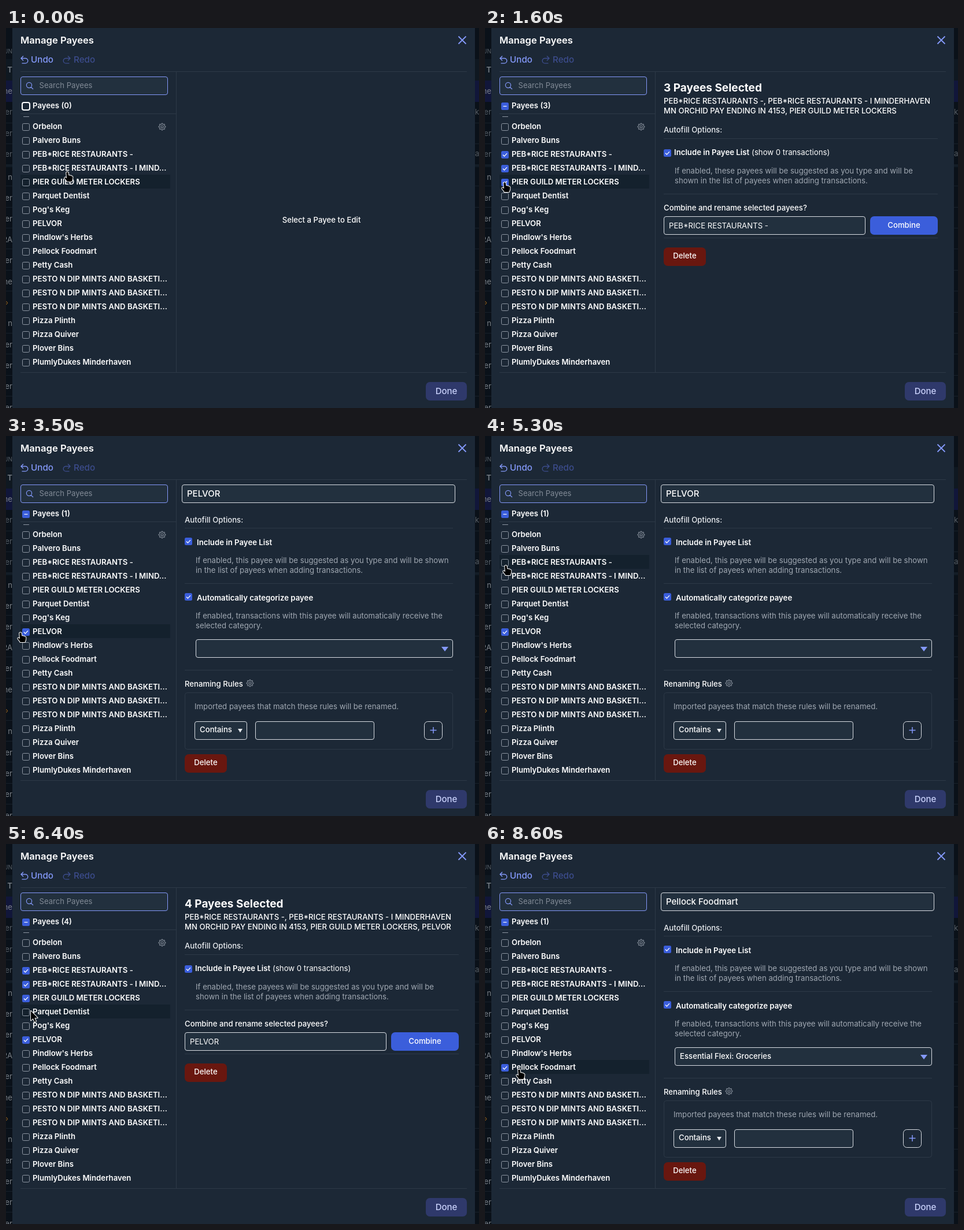
An HTML page with a canvas that plays this animation: 818 px wide and 658 px high, repeating every 9.1 s.

```html
<!DOCTYPE html>
<html lang="en">
<head>
<meta charset="utf-8">
<title>Manage Payees</title>
<style>
html, body { margin: 0; width: 100%; height: 100%; overflow: hidden; background: #0a1119; }
canvas { display: block; width: 818px; height: 658px; }
</style>
</head>
<body>
<canvas id="stage"></canvas>
<script>
const W = 818, H = 658, LOOP = 9100, STEP = 100;
const canvas = document.getElementById('stage');
const ctx = canvas.getContext('2d');
const dpr = window.devicePixelRatio || 1;
canvas.width = W * dpr;
canvas.height = H * dpr;

const C = {
  panel: '#1c2836', field: '#22303e', hover: '#14212d', line: '#2d3947', text: '#ffffff',
  soft: '#e8ebef', grey: '#a0a8b2', dim: '#818a96', accent: '#8499fa', faded: '#3c4c8c',
  blue: '#3b5edb', edge: '#d9dde3', box: '#8d96a2', red: '#69170f', done: '#2f396b'
};

const CITY = 'MINDERHAVEN';
const PESTO = 'PESTO N DIP MINTS AND BASKETI...';
const payees = [
  'Orbelon', 'Palvero Buns', 'PEB*RICE RESTAURANTS -', 'PEB*RICE RESTAURANTS - I MIND...',
  'PIER GUILD METER LOCKERS', 'Parquet Dentist', "Pog's Keg", 'PELVOR', "Pindlow's Herbs",
  'Pellock Foodmart', 'Petty Cash', PESTO, PESTO, PESTO, 'Pizza Plinth', 'Pizza Quiver',
  'Plover Bins', 'PlumlyDukes Minderhaven'
];
const categories = { 2: 'V:Fun: \u0394 Dining Out', 7: '', 9: 'Essential Flexi: Groceries' };

// time, ticked rows, rows shown in the detail panel
const states = [
  [0, [], []],
  [700, [2], [2]],
  [1200, [2, 3], [2, 3]],
  [1400, [2, 3, 4], [2, 3]],
  [1600, [2, 3, 4], [2, 3, 4]],
  [3500, [7], [7]],
  [5600, [7, 2], [7, 2]],
  [6000, [7, 2, 3], [7, 2, 3]],
  [6300, [7, 2, 3, 4], [7, 2, 3, 4]],
  [7500, [9], [9]]
];

// time, x, y of the pointer tip
const path = [
  [-100, 106, 262], [0, 106, 249], [400, 35, 216], [800, 33, 217], [1000, 34, 250],
  [1100, 34, 261], [1200, 34, 267], [1600, 34, 267], [2300, 25, 344], [2900, 25, 344],
  [3000, 25, 340], [4600, 25, 340], [5200, 37, 229], [5300, 36, 224], [5400, 36, 223],
  [5600, 36, 222], [5900, 35, 243], [6000, 35, 245], [6200, 36, 266], [6300, 41, 280],
  [6400, 43, 289], [6500, 43, 303], [7100, 57, 391], [8400, 57, 391], [8500, 61, 397],
  [8600, 59, 390], [9100, 59, 390]
];

function tipAt(t) {
  let i = 1;
  while (i < path.length - 1 && path[i][0] < t) i++;
  const [t0, x0, y0] = path[i - 1], [t1, x1, y1] = path[i];
  let k = Math.min(1, Math.max(0, (t - t0) / (t1 - t0)));
  if (t1 - t0 > 300) k = k * k * (3 - 2 * k);
  return { x: x0 + (x1 - x0) * k, y: y0 + (y1 - y0) * k };
}

function text(s, x, y, { size = 13.2, weight = 400, color = C.text, align = 'left' } = {}) {
  ctx.font = `${weight} ${size}px Inter, "Open Sans", sans-serif`;
  ctx.fillStyle = color;
  ctx.textAlign = align;
  ctx.fillText(s, x, y);
  return ctx.measureText(s).width;
}

function fill(x, y, w, h, r, color) {
  ctx.fillStyle = color;
  ctx.beginPath();
  ctx.roundRect(x, y, w, h, r);
  ctx.fill();
}

// outline on pixel centres
function frame(x, y, w, h, r, color, width = 1) {
  const d = width / 2;
  ctx.strokeStyle = color;
  ctx.lineWidth = width;
  ctx.beginPath();
  ctx.roundRect(x + d, y + d, w - width, h - width, r);
  ctx.stroke();
}

function field(x, y, w, color = C.edge) {
  fill(x, y, w, 32, 4, C.field);
  frame(x, y, w, 32, 3.5, color);
}

function stroke(d, color, width = 1) {
  ctx.strokeStyle = color;
  ctx.lineWidth = width;
  ctx.stroke(new Path2D(d));
}

const rule = (x0, x1, y) => { ctx.fillStyle = C.line; ctx.fillRect(x0, y, x1 - x0, 1); };

function triangle(x, y, w, h, color) {
  ctx.fillStyle = color;
  ctx.fill(new Path2D(`M${x - w / 2} ${y}h${w}l${-w / 2} ${h}Z`));
}

function ticked(cx, cy) {
  fill(cx - 6.5, cy - 6.5, 13, 13, 2.5, C.blue);
  stroke(`M${cx - 3.5} ${cy}l2.4 2.6l4.6 -5`, '#fff', 1.3);
}

function gear(cx, cy) {
  ctx.strokeStyle = C.dim;
  ctx.lineWidth = 1.1;
  ctx.beginPath();
  for (let i = 0; i <= 64; i++) {
    const a = i * Math.PI / 32;
    const r = 5.1 + 0.8 * Math.tanh(3 * Math.cos(8 * a));
    ctx.lineTo(cx + r * Math.cos(a), cy + r * Math.sin(a));
  }
  ctx.stroke();
  ctx.beginPath();
  ctx.arc(cx, cy, 2, 0, 7);
  ctx.stroke();
}

function button(label, x, y, w, color, dy) {
  fill(x, y, w, 32, 7, color);
  text(label, x + w / 2, y + dy, { weight: 500, align: 'center' });
}

function backdrop() {
  ctx.fillStyle = '#0a1119';
  ctx.fillRect(0, 0, W, H);
  ctx.fillStyle = '#0f1821';
  ctx.fillRect(0, 54, W, 37);
  ctx.fillStyle = '#11163a';
  ctx.fillRect(0, 91, W, 37);
  ctx.fillStyle = '#111b25';
  ctx.fillRect(0, 236, W, 5);
  for (let y = 164; y < H; y += 36.4) {
    ctx.fillStyle = '#18212b';
    ctx.fillRect(0, Math.round(y), W, 1);
  }
  const cells = ['ne', 'er', 'er', 'er', 'n', 'er', 'er', 'RA', 'er', 'ne', '\u203a', 'n', 'er', 'er', 'er', 'er'];
  text('UN', 11, 44, { size: 10, color: '#565e67', align: 'right' });
  text('d T', 11, 77, { weight: 600, color: '#777e86', align: 'right' });
  cells.forEach((s, i) => {
    const y = 114 + 36.3 * i + (i > 3 ? 3.5 : 0) - (i > 6 ? 0.5 : 0);
    const color = s === '\u203a' ? '#8a5a1c' : i > 0 && i < 4 ? '#555c64' : '#7b8188';
    text(s, s === '\u203a' ? 4 : 11, y, { color, align: 'right' });
  });
  text('ki', 811, 150, { color: '#555c64' });
  text('ag', 811, 222, { color: '#555c64' });
  ctx.fillStyle = C.panel;
  ctx.fillRect(11, 0, 800, H);
}

function chrome() {
  text('Manage Payees', 25, 27, { size: 16.6, weight: 600 });
  stroke('M782.5 14.5l13 13M795.5 14.5l-13 13', C.accent, 1.8);
  const back = 'M30 48.5l-4 4l4 4M26 52.5h7.5a4.3 4.3 0 0 1 0 8.6h-6';
  stroke(back, C.accent, 1.4);
  text('Undo', 43, 60, { size: 15.2, weight: 500, color: C.accent });
  ctx.save();
  ctx.translate(137, 0);
  ctx.scale(-1, 1);
  stroke(back, C.faded, 1.4);
  ctx.restore();
  text('Redo', 117, 60, { size: 15.2, weight: 500, color: C.faded });
  rule(25, 797, 75);
  rule(25, 797, 596);
  ctx.fillStyle = C.line;
  ctx.fillRect(294, 76, 1, 520);
  fill(726, 613, 71, 32, 7, C.done);
  text('Done', 761.5, 634, { size: 15, weight: 500, color: '#c9d1fb', align: 'center' });
}

function list(ticks, count, hover, underline) {
  field(25, 84, 255, C.accent);
  ctx.strokeStyle = C.accent;
  ctx.lineWidth = 1.2;
  ctx.beginPath();
  ctx.arc(40, 99, 4.6, 0, 7);
  ctx.moveTo(43.3, 102.3);
  ctx.lineTo(47, 106);
  ctx.stroke();
  text('Search Payees', 57.5, 104, { size: 13.1, color: C.dim });

  if (count) {
    fill(28, 129, 13, 13, 2.5, C.blue);
    stroke('M31.5 135.5h6', '#fff', 1.2);
  } else {
    frame(27, 128, 15, 15, 3, '#fff', 2);
  }
  text(`Payees (${count})`, 46, 139, { weight: 600 });
  rule(25, 294, 148);
  ctx.fillStyle = C.box;
  ctx.fillRect(30, 153, 10, 1);

  fill(25, 158 + 24 * hover, 259, 24, 0, C.hover);
  payees.forEach((name, i) => {
    const y = 24 * i;
    if (ticks.includes(i)) ticked(34.5, 171.5 + y);
    else frame(28, 165 + y, 13, 13, 2, C.box);
    const w = text(name, 46, 175 + y, { weight: 600 });
    if (underline === i) {
      ctx.fillStyle = C.text;
      ctx.fillRect(46, 176 + y, w, 1);
    }
  });
  gear(270, 171);
}

function options(lines, x, y) {
  lines.forEach((s, i) => text(s, x, y + 17 * i, { color: C.grey }));
}

function editor(row) {
  field(304, 84, 473);
  text(payees[row], 313, 105, { size: 15, weight: 500 });
  text('Autofill Options:', 309, 150, { weight: 500, color: C.soft });
  rule(309, 773, 159);
  ticked(315.5, 182.5);
  text('Include in Payee List', 330, 189, { weight: 600 });
  options(['If enabled, this payee will be suggested as you type and will be shown',
    'in the list of payees when adding transactions.'], 328, 220);
  rule(309, 773, 255);
  ticked(315.5, 278.5);
  text('Automatically categorize payee', 330, 285, { weight: 600 });
  options(['If enabled, transactions with this payee will automatically receive the',
    'selected category.'], 328, 316);
  field(328, 352, 445);
  text(categories[row], 337, 372, { weight: 500 });
  triangle(759, 365, 12, 8, C.accent);
  rule(309, 773, 405);
  text('Renaming Rules', 309, 434, { weight: 500 });
  gear(422, 428);
  frame(309, 444, 464, 99, 4, C.line);
  options(['Imported payees that match these rules will be renamed.'], 326, 473);
  field(326, 494, 91);
  text('Contains', 335, 513, { weight: 500 });
  triangle(405, 507, 8, 6.5, C.soft);
  field(431, 494, 206);
  frame(723, 494, 32, 32, 6, C.edge);
  stroke('M733.5 509.5h11M739 504v11', C.accent, 1.5);
  button('Delete', 309, 551, 73, C.red, 19);
}

function merger(rows) {
  text(`${rows.length} Payees Selected`, 309, 109.5, { size: 19, weight: 700 });
  const long = rows.includes(3);
  const head = long ? `${payees[2]}, ${payees[2]} I ${CITY}` : `${payees[2]}, ${payees[7]}`;
  text(head, 309, 131, { weight: 500 });
  ctx.save();
  if (long) {
    const tail = ['MN ORCHID PAY ENDING IN 4153'];
    if (rows.includes(4)) tail.push(payees[4]);
    if (rows.includes(7)) tail.push(payees[7]);
    text(tail.join(', '), 309, 148, { weight: 500 });
  } else {
    ctx.translate(0, -17);
  }
  text('Autofill Options:', 309, 181, { weight: 500, color: C.soft });
  rule(309, 783, 191);
  ticked(315.5, 216.5);
  const w = text('Include in Payee List', 327, 220, { weight: 600 });
  text('(show 0 transactions)', 331 + w, 220);
  options(['If enabled, these payees will be suggested as you type and will be',
    'shown in the list of payees when adding transactions.'], 328, 252);
  rule(309, 783, 287);
  text('Combine and rename selected payees?', 309, 316, { weight: 500 });
  field(309, 326, 349);
  text(payees[rows[0]], 318, 347);
  button('Combine', 666, 326, 117, C.blue, 20);
  rule(309, 783, 363);
  button('Delete', 309, 380, 73, C.red, 19);
  ctx.restore();
}

const hand = new Path2D('M-1.8 2Q-1.8 .3 0 .3T1.8 2L2.4 6.6Q3.5 5.3 4.8 6.8Q6.2 5.9 7.1 7.6Q9.3 7 9.4 9.2Q9.6 13.5 7.6 17H-.4Q-1.4 14.6-4.2 11.7Q-5.4 9.6-3.4 9.4L-1 11.2Z');
const arrow = new Path2D('M0 0V16.5L3.8 13L6.4 19L9 17.9L6.4 12H11.6Z');

function pointer(tip, shape) {
  ctx.save();
  ctx.translate(tip.x, tip.y);
  ctx.lineJoin = 'round';
  ctx.strokeStyle = '#fff';
  ctx.lineWidth = 2;
  ctx.stroke(shape);
  ctx.fillStyle = '#000';
  ctx.fill(shape);
  ctx.restore();
}

function draw(now) {
  const t = Math.floor((now % LOOP) / STEP) * STEP;
  const [, ticks, shown] = states.filter(s => s[0] <= t).pop();
  // row highlight trails the pointer by one step
  const hover = Math.floor((tipAt(t - STEP).y - 158) / 24);
  const underline = t >= 7300 && t < 7500 ? 9 : -1;

  ctx.setTransform(dpr, 0, 0, dpr, 0, 0);
  backdrop();
  chrome();
  list(ticks, shown.length, hover, underline);
  if (!shown.length) {
    text('Select a Payee to Edit', 545.5, 337, { weight: 500, align: 'center' });
  } else if (shown.length === 1) {
    editor(shown[0]);
  } else {
    merger(shown);
  }
  pointer(tipAt(t), t >= 6300 && t < 7000 ? arrow : hand);
}

const start = performance.now();
function tick() {
  draw(performance.now() - start);
  requestAnimationFrame(tick);
}
tick();
</script>
</body>
</html>
```
